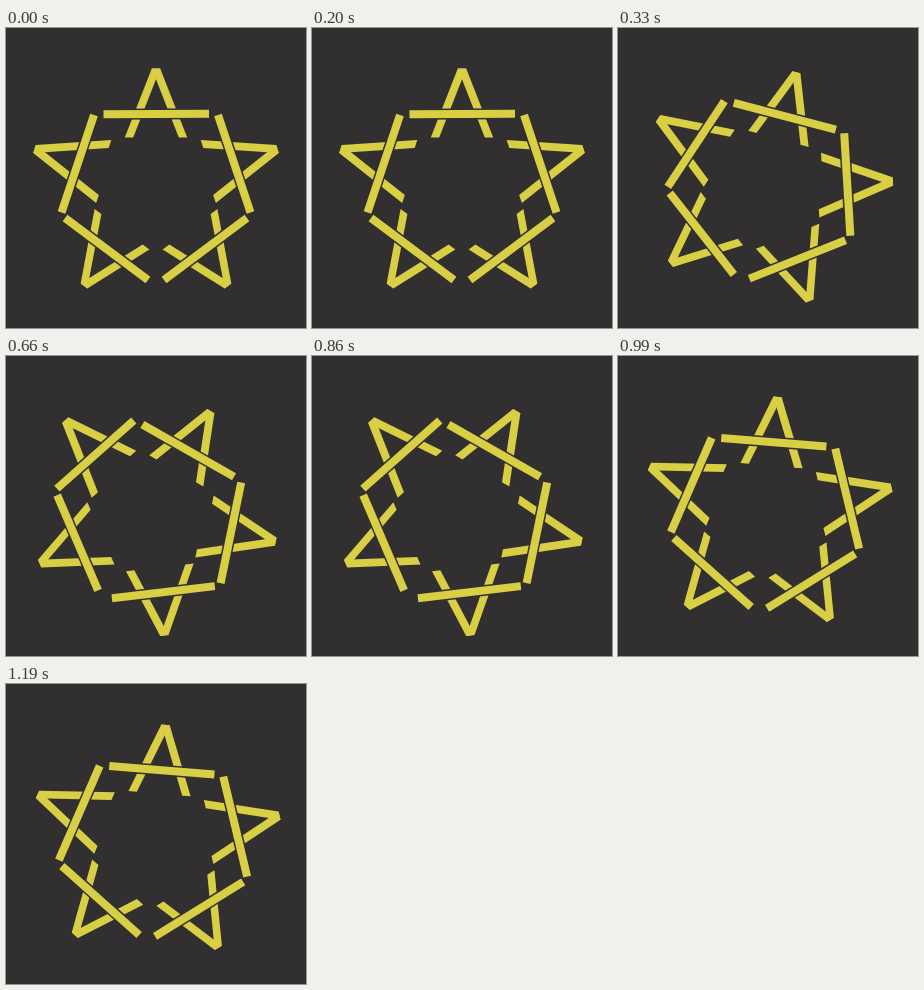
Recreate the animation shown at these times as an HTML page with a canvas. Size 300 by 300 pixels, loop 1.33 s.

```html
<!DOCTYPE html>
<html lang="en">
<head>
<meta charset="utf-8">
<title>Turning star</title>
<style>
  html, body { margin: 0; width: 100%; height: 100%; overflow: hidden; background: #322f31; }
  canvas { display: block; width: 300px; height: 300px; }
</style>
</head>
<body>
<canvas id="stage" width="300" height="300"></canvas>
<script>
(() => {
  const ctx = document.getElementById('stage').getContext('2d');
  const BG = '#322f31';
  const YELLOW = '#d8cf44';
  const SIZE = 300;
  const LOOP = 1330;
  const STEP = 330;
  const ANGLES = [0, 15, 30, 5];

  // Each arm: a bar laid over two legs that meet at the tip.
  const crown = { bar: [[97.5, 86.3], [203, 85.7]], tip: [150, 40.5], ends: [[123, 109.5], [177, 109.5]] };
  const side = { bar: [[212, 87], [244.5, 184.5]], tip: [271.5, 121], ends: [[196, 116], [208.5, 171]] };
  const foot = { bar: [[241, 190], [158, 252]], tip: [222, 258], ends: [[208, 183.5], [160, 219]] };

  const flip = ([x, y]) => [SIZE - x, y];
  const mirror = arm => ({ bar: arm.bar.map(flip), tip: flip(arm.tip), ends: arm.ends.map(flip) });
  const arms = [crown, side, foot, mirror(foot), mirror(side)];

  function strokeBar([a, b], color, width) {
    ctx.strokeStyle = color;
    ctx.lineWidth = width;
    ctx.beginPath();
    ctx.moveTo(...a);
    ctx.lineTo(...b);
    ctx.stroke();
  }

  // A leg is cut parallel to its bar at both ends.
  function fillLeg(tip, end, [dx, dy]) {
    ctx.beginPath();
    ctx.moveTo(tip[0] - dx, tip[1] - dy);
    ctx.lineTo(tip[0] + dx, tip[1] + dy);
    ctx.lineTo(end[0] + dx, end[1] + dy);
    ctx.lineTo(end[0] - dx, end[1] - dy);
    ctx.fill();
  }

  function drawArm({ bar, tip, ends }) {
    const [[x1, y1], [x2, y2]] = bar;
    const k = 4.2 / Math.hypot(x2 - x1, y2 - y1);
    const cut = [(x2 - x1) * k, (y2 - y1) * k];
    ctx.fillStyle = YELLOW;
    ends.forEach(end => fillLeg(tip, end, cut));
    strokeBar(bar, BG, 11);
    strokeBar(bar, YELLOW, 8);
  }

  function draw(time) {
    const pose = Math.min(ANGLES.length - 1, Math.floor((time % LOOP) / STEP));
    ctx.fillStyle = BG;
    ctx.fillRect(0, 0, SIZE, SIZE);
    ctx.save();
    ctx.translate(SIZE / 2, SIZE / 2);
    ctx.rotate(ANGLES[pose] * Math.PI / 180);
    ctx.translate(-SIZE / 2, -SIZE / 2);
    arms.forEach(drawArm);
    ctx.restore();
  }

  const start = performance.now();
  function tick() {
    draw(performance.now() - start);
    requestAnimationFrame(tick);
  }
  tick();
})();
</script>
</body>
</html>
```
